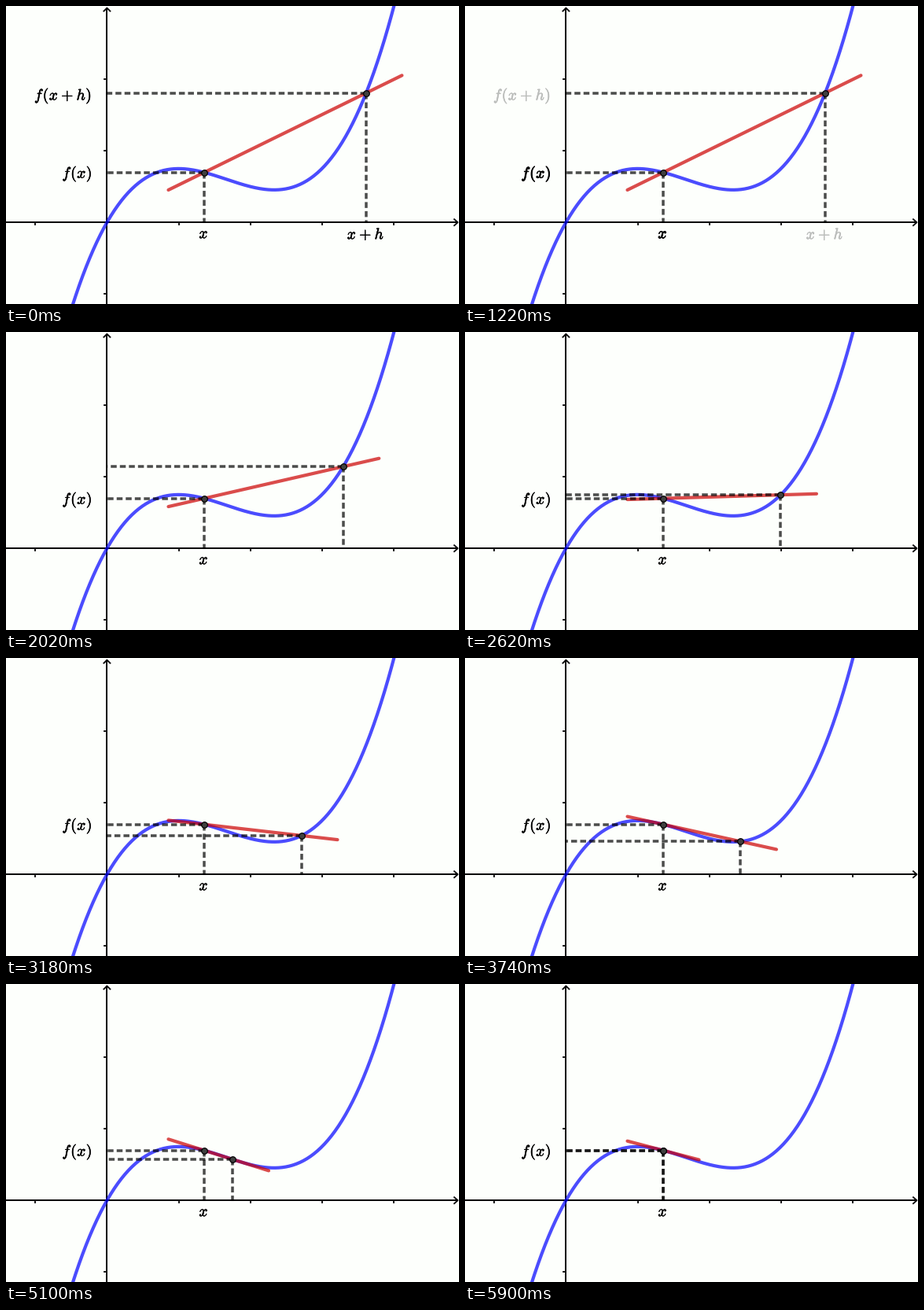
Recreate the animation shown at these times as a matplotlib script. Size 576 px wide and 379 px high, loop 8 s.

```python
import numpy as np
import matplotlib.pyplot as plt
from matplotlib.animation import FuncAnimation
from matplotlib.patheffects import withStroke

plt.rcParams["mathtext.fontset"] = "cm"
plt.rcParams["lines.scale_dashes"] = False

W, H, DPI = 576, 379, 72        # at 72 dpi one point is one pixel
OX, OY, UNIT = 128.4, 275.2, 91.1
BG = np.array([0.992, 1.0, 0.990])

TICK = 20                       # ms per frame
FRAMES = 400
HOLD = 25                       # frames before anything changes
FADE_END = 21                   # steps of two frames each
MOVE_START, MOVE_END = 23, 136
X0, STEP = 1.357, 0.02
REACH = 0.5                     # secant overhang on both sides


def f(x):
    return x**3 / 4 - 1.25 * x**2 + 1.75 * x


def slope(x):
    return 0.75 * x**2 - 2.5 * x + 1.75


def px(x):
    return OX + UNIT * x


def py(y):
    return OY - UNIT * y


fig = plt.figure(figsize=(W / DPI, H / DPI), dpi=DPI, facecolor=BG)
ax = fig.add_axes([0, 0, 1, 1])
ax.set_xlim(0, W)
ax.set_ylim(H, 0)
ax.axis("off")


def line(xs, ys, color="black", width=2, z=1, **kw):
    return ax.plot(xs, ys, color=color, lw=width, zorder=z, **kw)[0]


def dashed():
    return line([], [], width=3.5, z=4, alpha=0.7,
                linestyle=(0, (7.5, 4.03)), dash_capstyle="butt")


def dot():
    return ax.plot([], [], "o", ms=7.6, mfc="#404040", mec="black",
                   mew=1.2, zorder=5)[0]


def label(x, y, tex):
    return ax.text(x, y, f"${tex}$", size=19.5, ha="center", va="baseline",
                   path_effects=[withStroke(linewidth=0.55)], zorder=6)


def drop_lines(across, down, x):
    """Dashes run from the curve point to each axis."""
    cx, cy = px(x), py(f(x))
    across.set_data([cx, OX], [cy, cy])
    down.set_data([cx, cx], [cy, OY])


# axes with open arrowheads and ticks
line([0, 574], [OY, OY])
line([OX, OX], [H, 3])
line([570, 574.5, 570], [OY - 4, OY, OY + 4], width=1.8)
line([OX - 4, OX, OX + 4], [6.5, 2.5, 6.5], width=1.8)
for n in (-1, 1, 2, 3, 4):
    line([px(n)] * 2, [OY, OY + 3], width=1.8)
for n in (-1, 1, 2):
    line([OX - 3, OX], [py(n)] * 2, width=1.8)

xs = np.linspace(-0.7, 4.2, 300)
line(px(xs), py(f(xs)), "blue", 4.2, 2, alpha=0.7)
secant = line([], [], "#cc0000", 4.2, 3, alpha=0.7, solid_capstyle="round")

fixed_lines = dashed(), dashed()
moving_lines = dashed(), dashed()
fixed_dot, moving_dot = dot(), dot()
drop_lines(*fixed_lines, X0)
fixed_dot.set_data([px(X0)], [py(f(X0))])

SUM = r"x\hspace{0.05}+\hspace{0.05}h"
OPEN, CLOSE = r"f\hspace{0.07}(\hspace{0.03}", r"\hspace{0.03})"
steady = [label(90.5, 218.5, OPEN + "x" + CLOSE),
          label(251.5, 295.3, "x")]
fading = [label(72.5, 119.3, OPEN + SUM + CLOSE),
          label(457.5, 296.3, SUM)]


def update(i):
    k = min(max((i - HOLD) // 2 + 1, 0), MOVE_END)

    shown = max(0.0, 1 - (k / FADE_END) ** 3)
    for text in fading:
        text.set_color(tuple(BG * (1 - shown)))
        text.set_visible(shown > 0)
    weight = 0.9 if 0 < k < FADE_END else 0.55
    for text in steady:
        text.set_path_effects([withStroke(linewidth=weight)])

    h = STEP * (MOVE_END - max(k, MOVE_START))
    x = X0 + h
    m = (f(x) - f(X0)) / h if h else slope(X0)
    ends = np.array([X0 - REACH, x + REACH])
    secant.set_data(px(ends), py(f(X0) + m * (ends - X0)))
    drop_lines(*moving_lines, x)
    moving_dot.set_data([px(x)], [py(f(x))])
    return [secant, moving_dot, *moving_lines, *steady, *fading]


anim = FuncAnimation(fig, update, frames=FRAMES, interval=TICK, repeat=True,
                     repeat_delay=0, cache_frame_data=False)
plt.show()
```
